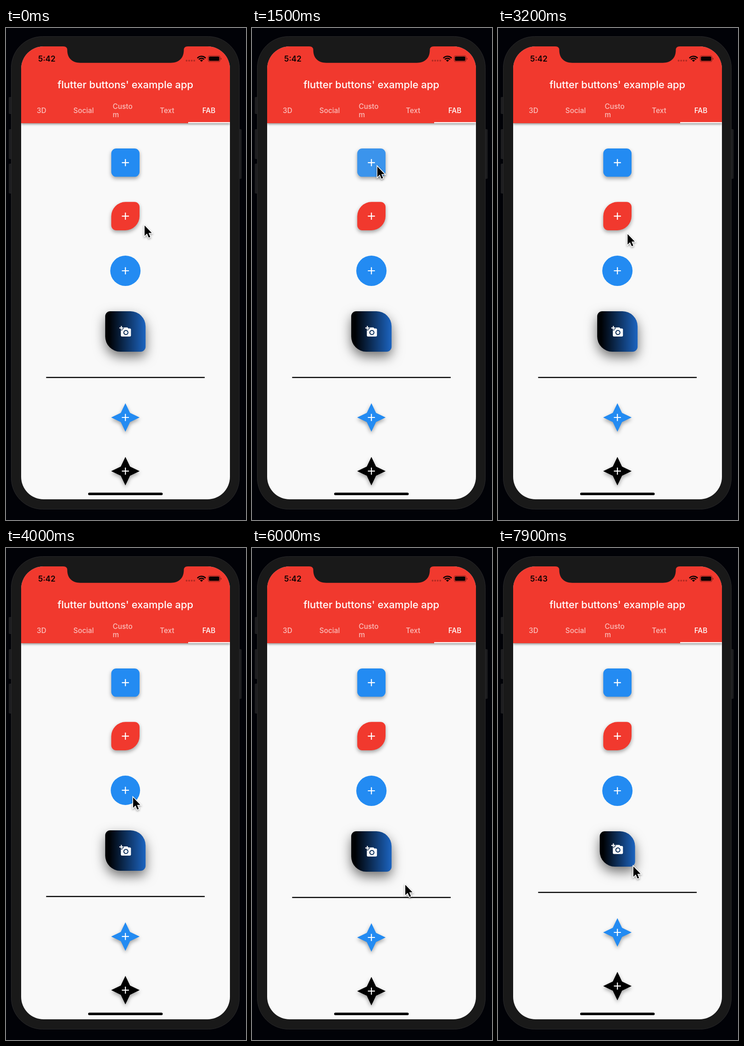
Write an HTML page with a canvas that moves like this. It is 523x1070 px and loops after 8 s.

```html
<!DOCTYPE html>
<html lang="en">
<head>
<meta charset="utf-8">
<title>Buttons demo</title>
<style>
  html, body { margin: 0; width: 100%; height: 100%; overflow: hidden; background: #010207; }
  canvas { display: block; }
</style>
</head>
<body>
<canvas id="stage" width="523" height="1070"></canvas>
<script>
const ctx = document.getElementById('stage').getContext('2d');
const LOOP = 8000;
const CX = 260.2;
const RED = '#f1392e', BLUE = '#238bf2', BEZEL = '#191919', PAGE = '#f9f9f9';
const FONT = 'Inter, Roboto, sans-serif';

const PLUS = new Path2D('M19 13h-6v6h-2v-6H5v-2h6V5h2v6h6v2z');
const CAMERA = new Path2D('M3 4V1h2v3h3v2H5v3H3V6H0V4h3zm3 6V7h3V4h7l1.83 2H21c1.1 0 2 .9 2 2v12c0 1.1-.9 2-2 2H5c-1.1 0-2-.9-2-2V10h3z' +
  'm7 9c2.76 0 5-2.24 5-5s-2.24-5-5-5-5 2.24-5 5 2.24 5 5 5zm-3.2-5c0 1.77 1.43 3.2 3.2 3.2s3.2-1.43 3.2-3.2-1.43-3.2-3.2-3.2-3.2 1.43-3.2 3.2z');
const ARROW = new Path2D('M0 0V22.6L5.2 17.6L9 26.3L12.4 24.9L8.7 16.3H15.7Z');

// Pointer stops: time, x, y
const STOPS = [
  [0, 302, 429.5], [150, 302, 429.5], [800, 273, 299.5], [1450, 273, 299.5],
  [2150, 284, 420.5], [3000, 284, 420.5], [3650, 277, 542.5], [5000, 277, 542.5],
  [5800, 334, 732.5], [6200, 334, 732.5], [6850, 295, 692.5], [8000, 295, 692.5]
];

const clamp = v => Math.max(0, Math.min(1, v));
const ramp = (t, a, b) => clamp((t - a) / (b - a));
const ease = u => u * u * (3 - 2 * u);

function pointerAt(t) {
  const i = STOPS.findIndex((s, k) => k > 0 && t <= s[0]);
  const [t0, x0, y0] = STOPS[i - 1], [t1, x1, y1] = STOPS[i];
  const u = ease(ramp(t, t0, t1));
  return [x0 + (x1 - x0) * u, y0 + (y1 - y0) * u];
}

function rounded(x, y, w, h, r) {
  const p = new Path2D();
  p.roundRect(x, y, w, h, r);
  return p;
}

function disc(x, y, r) {
  const p = new Path2D();
  p.arc(x, y, r, 0, Math.PI * 2);
  return p;
}

function star(y) {
  const p = new Path2D();
  for (let i = 0; i < 8; i++) {
    const a = i * Math.PI / 4, r = i % 2 ? 14.2 : 31;
    p.lineTo(CX + r * Math.cos(a), y + r * Math.sin(a));
  }
  p.closePath();
  return p;
}

function fill(path, color) {
  ctx.fillStyle = color;
  ctx.fill(path);
}

function raised(path, color, dy = 4, blur = 9, alpha = 0.36) {
  ctx.save();
  ctx.shadowColor = `rgba(0,0,0,${alpha})`;
  ctx.shadowBlur = blur;
  ctx.shadowOffsetY = dy;
  fill(path, color);
  ctx.restore();
}

function icon(path, y) {
  ctx.save();
  ctx.translate(CX, y);
  ctx.scale(1.1, 1.1);
  ctx.translate(-12, -12);
  fill(path, '#fff');
  ctx.restore();
}

function text(str, x, y, size, weight, color, align = 'center') {
  ctx.font = `${weight} ${size}px ${FONT}`;
  ctx.textAlign = align;
  ctx.fillStyle = color;
  ctx.fillText(str, x, y);
}

function splash(path, t, start, [x, y]) {
  const age = t - start;
  if (age <= 0 || age > 650) return;
  const fade = 1 - ramp(age, 350, 650);
  ctx.save();
  ctx.clip(path);
  fill(path, `rgba(188,188,188,${0.25 * ramp(age, 0, 200) * fade})`);
  fill(disc(x, y, 5 + 55 * ramp(age, 60, 450)), `rgba(200,200,200,${0.2 * ramp(age, 60, 160) * fade})`);
  ctx.restore();
}

function phone() {
  ctx.fillStyle = '#010207';
  ctx.fillRect(0, 0, 523, 1070);
  for (const [x, y, h] of [[6, 150, 37], [6, 220, 65], [6, 295, 65], [506, 220, 108]])
    fill(rounded(x, y, 7.5, h, 2), '#1d1d1f');
  const body = rounded(11.5, 18.5, 497, 1028, 68);
  fill(body, BEZEL);
  ctx.strokeStyle = '#29292b';
  ctx.lineWidth = 1;
  ctx.stroke(body);
}

function header(clock) {
  ctx.save();
  ctx.shadowColor = 'rgba(0,0,0,.45)';
  ctx.shadowBlur = 5;
  ctx.shadowOffsetY = 2;
  ctx.fillStyle = RED;
  ctx.fillRect(33, 40, 455, 167);
  ctx.restore();

  fill(new Path2D('M125 39V40Q133.500 40 133.500 48C133.500 66 145 75.700 162 75.700H359C376 75.700 387.500 66 387.500 48Q387.500 40 396 40V39Z'), BEZEL);

  text(clock, 70, 73, 17, 600, '#0b0202', 'left');
  for (let i = 0; i < 4; i++) fill(disc(393.5 + i * 5.6, 71, 1.9), 'rgba(0,0,0,.27)');
  wifi();
  battery();

  text("flutter buttons' example app", CX, 131, 22, 500, '#fff');
  const dim = 'rgba(255,255,255,.68)';
  const tab = (s, x, y, color = dim, align) => text(s, x, y, 15.4, 500, color, align);
  tab('3D', 77.5, 184.5);
  tab('Social', 169, 184.5);
  tab('Custo', 232.5, 175.5, dim, 'left');
  tab('m', 232.5, 193.5, dim, 'left');
  tab('Text', 351, 184.5);
  tab('FAB', 442, 184.5, '#fff');
  ctx.fillStyle = '#fff';
  ctx.fillRect(397, 204.7, 91, 2.3);
}

function wifi() {
  const x = 426, y = 73.5, a = Math.PI * 0.27;
  ctx.strokeStyle = '#0b0202';
  ctx.lineWidth = 2.6;
  for (const r of [12, 7.6]) {
    ctx.beginPath();
    ctx.arc(x, y, r, -Math.PI / 2 - a, -Math.PI / 2 + a);
    ctx.stroke();
  }
  const tip = new Path2D();
  tip.moveTo(x, y);
  tip.arc(x, y, 4.4, -Math.PI / 2 - a, -Math.PI / 2 + a);
  tip.closePath();
  fill(tip, '#0b0202');
}

function battery() {
  ctx.strokeStyle = 'rgba(0,0,0,.45)';
  ctx.lineWidth = 1.1;
  ctx.stroke(rounded(440.5, 60.3, 26, 13, 3.6));
  fill(rounded(442.2, 62, 22.6, 9.6, 2.2), '#0b0202');
  fill(rounded(467.8, 64.7, 1.5, 4.4, 1), 'rgba(0,0,0,.45)');
}

function buttons(t, pointer) {
  const square = rounded(229.4, 262, 61.6, 61.6, 11);
  raised(square, BLUE);
  splash(square, t, 950, pointer);
  icon(PLUS, 292.8);

  const leaf = rounded(229.4, 378.3, 61.6, 61.6, [31, 11, 31, 11]);
  raised(leaf, RED);
  splash(leaf, t, 2350, pointer);
  icon(PLUS, 409.2);

  // Held buttons shrink by an eighth and pull up whatever is below
  const roundHold = ramp(t, 3900, 4300) - ramp(t, 4530, 4760);
  const d = 66 * (1 - roundHold / 8);
  fill(disc(CX, 495 + d / 2, d / 2), BLUE);
  icon(PLUS, 495 + d / 2);

  const top = 550 + d;
  const side = 88 * (1 - ramp(t, 6950, 7330) / 8);
  const left = CX - side / 2;
  const grad = ctx.createLinearGradient(left, 0, left + side, 0);
  grad.addColorStop(0, '#000205');
  grad.addColorStop(0.1, '#000205');
  grad.addColorStop(1, '#1c64c0');
  raised(rounded(left, top, side, side, [11, 33, 11, 33]), grad, 11, 26, 0.55);
  icon(CAMERA, top + side / 2);

  const end = top + side;
  ctx.fillStyle = '#000';
  ctx.fillRect(87.5, end + 54.8, 345.5, 2.4);
  for (const [dy, color] of [[143, BLUE], [259.7, '#000']]) {
    raised(star(end + dy), color);
    icon(PLUS, end + dy);
  }
}

function arrow([x, y]) {
  ctx.save();
  ctx.translate(x, y);
  ctx.lineJoin = 'miter';
  ctx.lineWidth = 3;
  ctx.strokeStyle = '#fff';
  ctx.shadowColor = 'rgba(0,0,0,.4)';
  ctx.shadowBlur = 4;
  ctx.shadowOffsetY = 2;
  ctx.stroke(ARROW);
  ctx.shadowColor = 'transparent';
  fill(ARROW, '#000');
  ctx.restore();
}

function draw(t) {
  const pointer = pointerAt(t);
  phone();
  ctx.save();
  ctx.clip(rounded(33, 40, 455, 985, 49));
  ctx.fillStyle = PAGE;
  ctx.fillRect(33, 40, 455, 985);
  buttons(t, pointer);
  header(t < 6800 ? '5:42' : '5:43');
  fill(rounded(179, 1010.5, 162.5, 5.6, 2.8), '#000');
  ctx.restore();
  arrow(pointer);
}

const began = performance.now();
function tick() {
  draw((performance.now() - began) % LOOP);
  requestAnimationFrame(tick);
}
tick();
</script>
</body>
</html>
```
